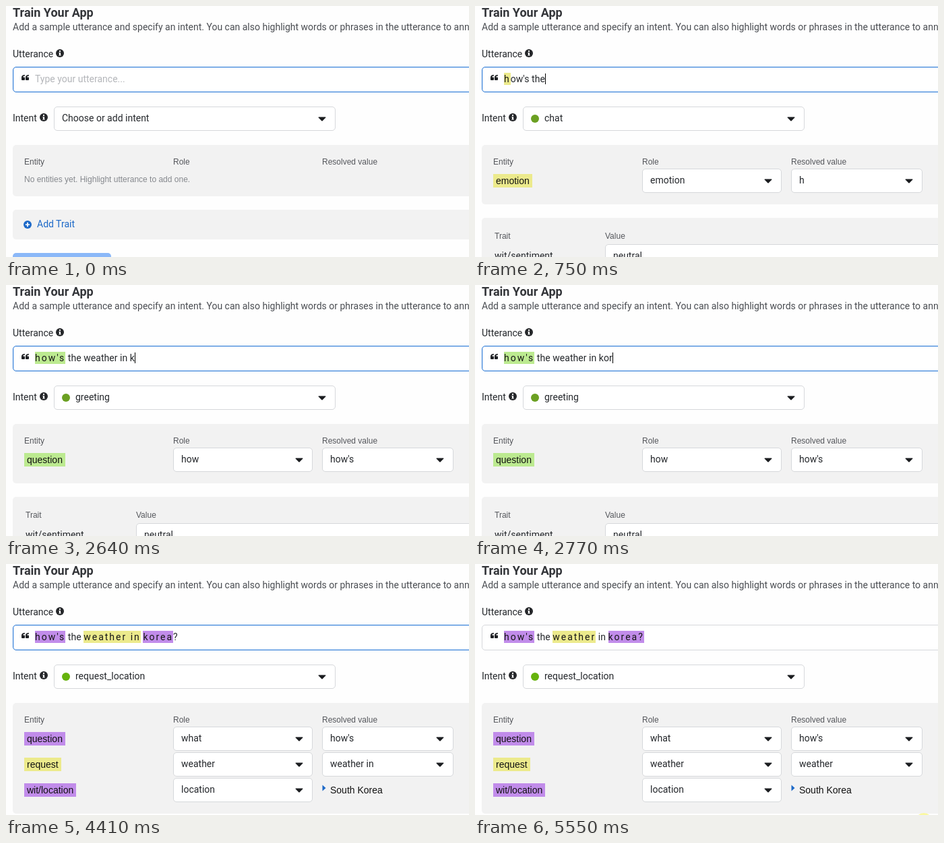
An HTML page that plays this animation: 687x372 px, repeating every 6.01 s.

```html
<!DOCTYPE html>
<html lang="en">
<head>
<meta charset="utf-8">
<title>Train Your App</title>
<style>
  html, body { margin: 0; width: 100%; height: 100%; overflow: hidden; background: #fff; }
  #stage { position: relative; width: 687px; height: 372px; overflow: hidden; background: #fefefe; }
  #stage div, #stage svg { position: absolute; box-sizing: border-box; }
  .t { white-space: pre; line-height: 20px; font: 14px/20px Roboto, sans-serif; color: #25282c; }
  .title { font-weight: 700; font-size: 18px; color: #333539; }
  .body { color: #4a4d52; }
  .small { font: 12px/20px "Liberation Sans", Arial, sans-serif; color: #55575c; }
  .muted { color: #85888d; }
  .sans { font: 14px/20px "Liberation Sans", Arial, sans-serif; color: #111; }
  .link { color: #1c69c8; }
  .hint { color: #b4b6ba; }
  .box { background: #fff; border: 1px solid #d6d8db; border-radius: 5px; }
  .focus { border-color: #2e7bd6; box-shadow: inset 0 0 0 1px #dbe9fa; }
  .panel { background: #f2f2f2; border-radius: 5px; }
  .plain { letter-spacing: .04px; }
  .mark { letter-spacing: 2px; padding: 1px 0; color: #161616; }
  .caret { display: inline-block; width: 1px; height: 16px; margin-right: -1px; background: #000; vertical-align: -3px; }
</style>
</head>
<body>
<div id="stage"></div>
<script>
const LOOP = 6010;
const YELLOW = '#ecea8c', GREEN = '#bcea90', PURPLE = '#c18cea';
const INKS = { y: YELLOW, g: GREEN, p: PURPLE };

const emotion = { tag: 'emotion', ink: YELLOW, role: 'emotion', value: 'h' };
const how = { tag: 'question', ink: GREEN, role: 'how', value: "how's" };
const what = { tag: 'question', ink: PURPLE, role: 'what', value: "how's" };
const request = { tag: 'request', ink: YELLOW, role: 'weather', value: 'weather' };
const requestIn = { ...request, value: 'weather in' };
const place = { tag: 'wit/location', ink: PURPLE, role: 'location', fact: 'South Korea' };

const DARK_DOT = '#6ba022', DOT = '#66b30d';
const scenes = {
  empty: { intent: 'Choose or add intent', rows: [] },
  chat: { intent: 'chat', dot: DARK_DOT, rows: [emotion] },
  greet: { intent: 'greeting', dot: DARK_DOT, rows: [how] },
  ask: { intent: 'greeting', rows: [what, request] },
  locate: { intent: 'request_location', dot: DOT, rows: [what, requestIn, place] },
  final: { intent: 'request_location', dot: DOT, rows: [what, request, place] },
  blurred: { intent: 'request_location', dot: DOT, rows: [what, request, place], blur: true }
};

// [start ms, scene, utterance]; {ink:words} is highlighted, | is the caret
const ASK = "{p:how's} the {y:weather} in korea";
const LOCATE = "{p:how's} the {y:weather in} {p:korea}?";
const FINAL = "{p:how's} the {y:weather} in {p:korea?}";
const steps = [
  [0, 'empty', ''],
  [130, 'empty', 'h|'],
  [250, 'empty', 'ho|'],
  [380, 'empty', 'how|'],
  [500, 'empty', "how's|"],
  [630, 'empty', "how's t|"],
  [750, 'chat', "{y:h}ow's the|"],
  [880, 'chat', "{y:h}ow's the |"],
  [1250, 'chat', "{y:h}ow's the w|"],
  [1500, 'chat', "{y:h}ow's the we|"],
  [1630, 'chat', "{y:h}ow's the wea|"],
  [1770, 'greet', "{g:how's} the weat|"],
  [1900, 'greet', "{g:how's} the weathe|"],
  [2020, 'greet', "{g:how's} the weather|"],
  [2140, 'greet', "{g:how's} the weather i|"],
  [2390, 'greet', "{g:how's} the weather in |"],
  [2640, 'greet', "{g:how's} the weather in k|"],
  [2770, 'greet', "{g:how's} the weather in kor|"],
  [2890, 'ask', ASK + '|'],
  [3140, 'ask', ASK + '?|'],
  [3640, 'ask', ASK + '?'],
  [3890, 'locate', LOCATE + '|'],
  [4410, 'locate', LOCATE],
  [4780, 'final', FINAL + '|'],
  [5280, 'final', FINAL],
  [5550, 'blurred', FINAL]
];

const text = (x, y, words, cls = '') =>
  `<div class="t ${cls}" style="left:${x}px;top:${y}px">${words}</div>`;
const rect = (x, y, w, h, cls, css = '') =>
  `<div class="${cls}" style="left:${x}px;top:${y}px;width:${w}px;height:${h}px;${css}"></div>`;
const svg = (x, y, w, h, art) =>
  `<svg style="left:${x}px;top:${y}px" width="${w}" height="${h}">${art}</svg>`;

const dot = (x, y, color) => svg(x - 6, y - 6, 12, 12, `<circle cx="6" cy="6" r="6" fill="${color}"/>`);
const arrow = (x, y) => svg(x - 6, y - 3, 12, 7,
  '<path d="M1 .5H11Q12 .8 11.3 1.6L6.7 6.2Q6 6.8 5.3 6.2L.7 1.6Q0 .8 1 .5Z" fill="#1b1d20"/>');
const info = (x, y) => svg(x - 6, y - 6, 12, 12,
  '<circle cx="6" cy="6" r="6" fill="#25272a"/>' +
  '<path d="M5 2h2v2H5zM4.4 5H7v3.4h.7v1.2H4.3V8.4H5V6.2h-.6z" fill="#fff"/>');
const plus = (x, y) => svg(x - 6, y - 6, 12, 12,
  '<circle cx="6" cy="6" r="6" fill="#1c69c8"/><path d="M6 2.8v6.4M2.8 6h6.4" stroke="#fff" stroke-width="1.7"/>');
const quoteMark = 'M5 0V1.4Q2.1 1.6 2.1 3.6H4Q5 3.6 5 4.6V7Q5 8 4 8H1Q0 8 0 7V3.8Q0 .1 5 0Z';
const quotes = svg(23, 102, 11, 8,
  `<path d="${quoteMark}" fill="#1d1f22"/><path d="${quoteMark}" transform="translate(6)" fill="#1d1f22"/>`);

const select = (x, y, w, words, color) =>
  rect(x, y, w, 36, 'box') +
  (color ? dot(x + 18, y + 18, color) : '') +
  text(x + (color ? 32 : 12), y + 7, words) +
  arrow(x + w - 20, y + 18);

const chip = (y, { tag, ink }) =>
  `<div class="t sans" style="left:27px;top:${y}px;padding:0 4px;background:${ink}">${tag}</div>`;

function entity(row, i) {
  const y = 241 + 38 * i;
  const value = row.fact
    ? svg(469, y + 90 - 76 + 76 - 76 - 4 + 0, 6, 10, '<path d="M.5 .5L5.5 5L.5 9.5Z" fill="#1c69c8"/>') +
      text(481, y + 8, row.fact, 'sans')
    : select(469, y, 195, row.value);
  return chip(y + 8, row) + select(248, y, 207, row.role) + value;
}

function utterance(words) {
  if (!words) return text(43, 98, 'Type your utterance...', 'hint');
  const html = words
    .replace(/\{(\w):([^}]*)\}/g, (_, ink, part) =>
      `<span class="mark" style="background:${INKS[ink]}">${part}</span>`)
    .replace('|', '<span class="caret"></span>');
  return text(43, 98, html, 'plain');
}

function traits(top, open) {
  if (!open) {
    return rect(10, top, 700, 44, 'panel') + plus(32, top + 22) + text(46, top + 11, 'Add Trait', 'link') +
      rect(10, top + 64, 146, 36, '', 'background:#8bb8f8;border-radius:5px');
  }
  return rect(10, top, 700, 120, 'panel') +
    text(29, top + 17, 'Trait', 'small') + text(193, top + 17, 'Value', 'small') +
    text(29, top + 46, 'wit/sentiment') +
    rect(193, top + 39, 520, 36, 'box') + text(205, top + 46, 'neutral');
}

function page(scene, words) {
  const { intent, dot: color, rows, blur } = scene;
  const bottom = rows.length ? 256 + 38 * rows.length : 282;
  return text(10, 0, 'Train Your App', 'title') +
    text(10, 21, 'Add a sample utterance and specify an intent. You can also highlight words ' +
      'or phrases in the utterance to annotate entities.', 'body') +
    text(10, 61, 'Utterance') + info(80, 70) +
    rect(10, 90, 700, 38, blur ? 'box' : 'box focus') + quotes + utterance(words) +
    text(10, 156, 'Intent') + info(56, 165) + select(71, 149, 418, intent, color) +
    rect(10, 206, 700, bottom - 206, 'panel') +
    text(27, 221, 'Entity', 'small') + text(248, 221, 'Role', 'small') +
    text(469, 221, 'Resolved value', 'small') +
    (rows.length
      ? rows.map(entity).join('')
      : text(27, 247, 'No entities yet. Highlight utterance to add one.', 'small muted')) +
    traits(bottom + 20, rows.length > 0) +
    (blur ? rect(653, 369, 26, 26, '', 'border-radius:50%;background:#faf8a0') : '');
}

const stage = document.getElementById('stage');
let shown = -1;

function draw() {
  const time = performance.now() % LOOP;
  const now = steps.findLastIndex(([start]) => start <= time);
  if (now !== shown) {
    const [, scene, words] = steps[now];
    stage.innerHTML = page(scenes[scene], words);
    shown = now;
  }
  requestAnimationFrame(draw);
}
draw();
</script>
</body>
</html>
```
